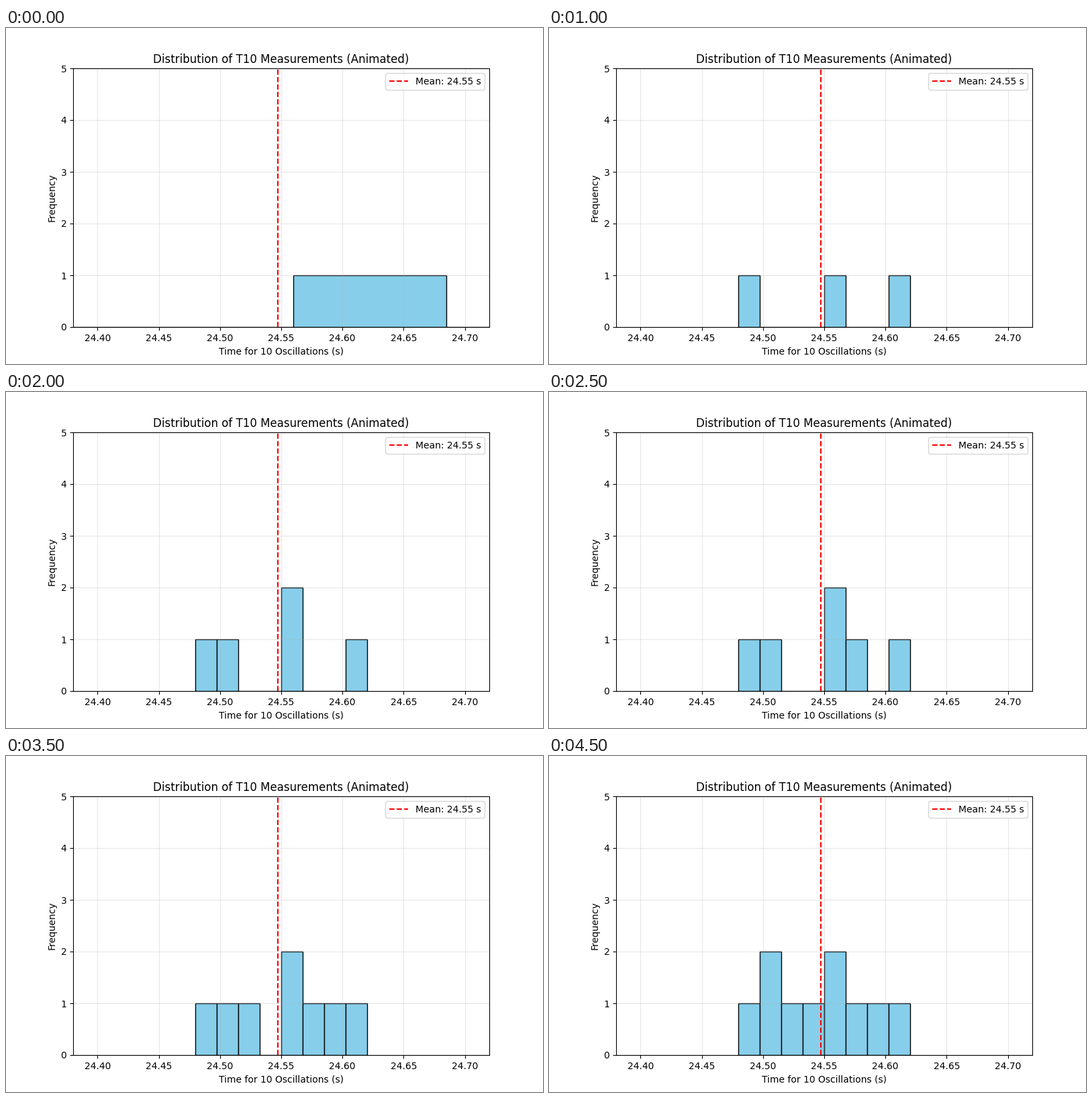
Write a matplotlib script that moves like this. It is 800 px wide and 500 px high and loops after 5 s.

```python
import numpy as np
import matplotlib.pyplot as plt
from matplotlib.animation import FuncAnimation

TIMES = np.array([24.56, 24.48, 24.62, 24.56, 24.50,
                  24.58, 24.52, 24.60, 24.51, 24.54])
BINS = 8
STEP_MS = 500

plt.rcParams["font.family"] = "DejaVu Sans"
fig, ax = plt.subplots(figsize=(8, 5), dpi=100)
mean = TIMES.mean()

bars = ax.bar(np.zeros(BINS), np.zeros(BINS), align="edge",
              color="skyblue", edgecolor="black")
ax.axvline(mean, color="red", linestyle="--", label=f"Mean: {mean:.2f} s")
ax.set_xlim(24.38, 24.72)
ax.set_ylim(0, 5)
ax.set_title("Distribution of T10 Measurements (Animated)")
ax.set_xlabel("Time for 10 Oscillations (s)")
ax.set_ylabel("Frequency")
ax.grid(True, alpha=0.3)
ax.legend(loc="upper right")


def update(frame):
    """Show the histogram of the first frame + 1 measurements."""
    counts, edges = np.histogram(TIMES[:frame + 1], bins=BINS)
    for bar, count, left, width in zip(bars, counts, edges, np.diff(edges)):
        bar.set_bounds(left, 0, width, count)
    return list(bars)


anim = FuncAnimation(fig, update, frames=len(TIMES), interval=STEP_MS,
                     init_func=lambda: update(0), repeat=True, blit=False)
plt.show()
```
